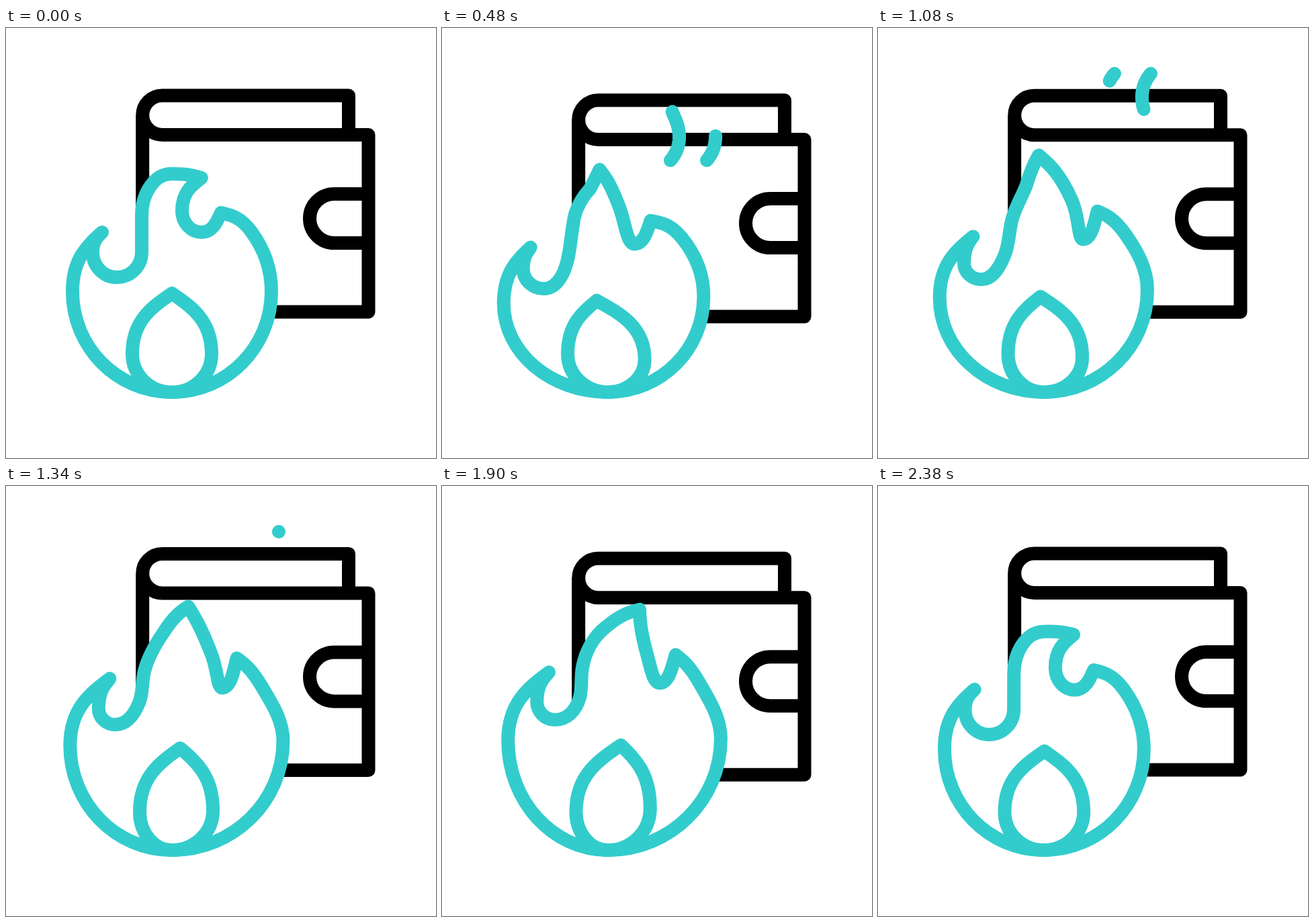
Animation of 640x640 px, one loop 2400 ms. Source, as an HTML page with a canvas:

```html
<!DOCTYPE html>
<html lang="en">
<head>
<meta charset="utf-8">
<title>Burning wallet</title>
<style>
  html, body { margin: 0; width: 100%; height: 100%; overflow: hidden; background: #fff; }
  canvas { display: block; width: 640px; height: 640px; }
</style>
</head>
<body>
<canvas id="stage" width="640" height="640"></canvas>
<script>
const ctx = document.getElementById('stage').getContext('2d');
const LOOP = 2400;
const TEAL = '#33cccc';
const CORNER = true;

const clamp = v => Math.min(1, Math.max(0, v));
const progress = (t, from, to) => clamp((t - from) / (to - from));
const smooth = u => u * u * (3 - 2 * u);
const cubicInOut = u => u < 0.5 ? 4 * u ** 3 : 1 - 4 * (1 - u) ** 3;
const mix = (a, b, k) => a.map((v, i) => v + (b[i] - v) * k);
const sub = (a, b) => [a[0] - b[0], a[1] - b[1]];
const dot = (a, b) => a[0] * b[0] + a[1] * b[1];
const along = (p, dir, length) => [p[0] + dir[0] * length, p[1] + dir[1] * length];

// Landmarks in the poses upright, leaning left, leaning right.
const flameMarks = [
  [[247, 542], [247, 542], [247, 542]],         // base
  [[99, 392], [88, 417], [98, 375]],            // left cheek
  [[143, 304], [128, 335], [164, 269], CORNER], // curl
  [[129, 334], [118, 370], [145, 317]],
  [[165, 371], [145, 394], [169, 341]],
  [[202, 334], [177, 358], [206, 309]],
  [[202, 280], [193, 294], [211, 268]],         // stem
  [[246, 217], [207, 250], [244, 207]],         // crown
  [[291, 223], [206, 200], [295, 172], CORNER], // tip
  [[262, 272], [270, 261], [319, 247]],         // hollow
  [[291, 304], [288, 329], [334, 290]],
  [[320, 275], [309, 290], [356, 244], CORNER], // shoulder
  [[365, 303], [356, 317], [388, 289]],
  [[395, 392], [389, 402], [421, 371]]          // right cheek
];
const dropMarks = [
  [[247, 542], [247, 542], [247, 542]],
  [[188, 485], [188, 485], [203, 485]],
  [[247, 395], [224, 410], [272, 383], CORNER],
  [[306, 485], [300, 497], [311, 478]]
];

// Geometric mean of both chords: level or upright at every extreme.
function tangent(before, at, after) {
  const a = sub(at, before), b = sub(after, at);
  const v = a.map((d, i) => Math.sign(d) * Math.sqrt(Math.max(0, d * b[i])));
  const length = Math.hypot(...v);
  return v.map(d => d / length);
}

// Bezier segments through the landmarks of one pose, as a flat list.
function outline(marks, pose) {
  const n = marks.length;
  const points = marks.map(m => m[pose]);
  const dirs = marks.map((m, i) =>
    m[3] ? null : tangent(points[(i + n - 1) % n], points[i], points[(i + 1) % n]));
  return points.flatMap((p, i) => {
    const j = (i + 1) % n, q = points[j], u = dirs[i], v = dirs[j];
    const chord = sub(q, p);
    const reach = u && v ? 1 / 3 + 0.22 * (1 - dot(u, v)) : 0.55;
    let out = u && along(p, u, reach * dot(chord, u));
    let into = v && along(q, v, -reach * dot(chord, v));
    out = out || mix(p, into, 0.5);
    into = into || mix(q, out, 0.5);
    return [...out, ...into, ...q];
  });
}

// The furthest lean to the left goes slightly beyond its landmarks.
function makeShape(marks) {
  const [rest, left, right] = [0, 1, 2].map(pose => outline(marks, pose));
  return { start: marks[0][0], rest, left: mix(left, right, -0.1), right };
}
const flame = makeShape(flameMarks);
const drop = makeShape(dropMarks);

function sway({ rest, left, right }, t) {
  if (t < 800) return mix(rest, left, t / 800);
  if (t < 1650) return mix(left, right, 1 - (1 - progress(t, 800, 1650)) ** 1.4);
  return mix(right, rest, progress(t, 1650, LOOP) ** 1.33);
}

function drawShape(shape, t) {
  const curve = sway(shape, t);
  ctx.beginPath();
  ctx.moveTo(...shape.start);
  for (let i = 0; i < curve.length; i += 6) ctx.bezierCurveTo(...curve.slice(i, i + 6));
  ctx.closePath();
  ctx.fill();
  ctx.stroke();
}

function drawWallet(t) {
  const u = (t % 1200) / 600;
  ctx.save();
  ctx.translate(0, 7.3 * cubicInOut(u < 1 ? u : 2 - u));
  ctx.strokeStyle = '#000';
  ctx.beginPath();
  ctx.moveTo(510, 159);
  ctx.lineTo(510, 100.5);
  ctx.lineTo(232.5, 100.5);
  ctx.arc(232.5, 129.75, 29.25, -Math.PI / 2, Math.PI / 2, true);
  ctx.lineTo(539.5, 159);
  ctx.lineTo(539.5, 422.5);
  ctx.lineTo(203.2, 422.5);
  ctx.lineTo(203.2, 129.75);
  ctx.moveTo(539.5, 247);
  ctx.lineTo(488.5, 247);
  ctx.arc(488.5, 283.5, 36.5, -Math.PI / 2, Math.PI / 2, true);
  ctx.lineTo(539.5, 320);
  ctx.stroke();
  ctx.restore();
}

const bezier = (a, b, c, d, u) =>
  a * (1 - u) ** 3 + 3 * b * u * (1 - u) ** 2 + 3 * c * u * u * (1 - u) + d * u ** 3;

// The upper half of a wisp is the lower half turned around its middle.
function wispPoint(f) {
  const upper = f > 0.5;
  const u = 2 * (upper ? 1 - f : f);
  const x = bezier(340, 354, 358, 346, u);
  const y = bezier(197, 181, 158, 132.5, u);
  return upper ? [692 - x, 265 - y] : [x, y];
}

function drawWisp(t, dx, headStart, tailStart) {
  const head = smooth(progress(t, headStart, headStart + 600));
  const tail = smooth(progress(t, tailStart, tailStart + 600));
  if (head <= tail) return;
  ctx.save();
  ctx.translate(dx, 0);
  ctx.beginPath();
  for (let i = 0; i <= 40; i++) ctx.lineTo(...wispPoint(tail + (head - tail) * i / 40));
  ctx.stroke();
  ctx.restore();
}

function draw() {
  const t = performance.now() % LOOP;
  ctx.fillStyle = '#fff';
  ctx.fillRect(0, 0, 640, 640);
  ctx.lineWidth = 20;
  ctx.lineCap = ctx.lineJoin = 'round';
  drawWallet(t);
  ctx.strokeStyle = TEAL;
  drawWisp(t, 0, 160, 600);
  drawWisp(t, 54, 260, 750);
  drawShape(flame, t);
  drawShape(drop, t);
  requestAnimationFrame(draw);
}
draw();
</script>
</body>
</html>
```
